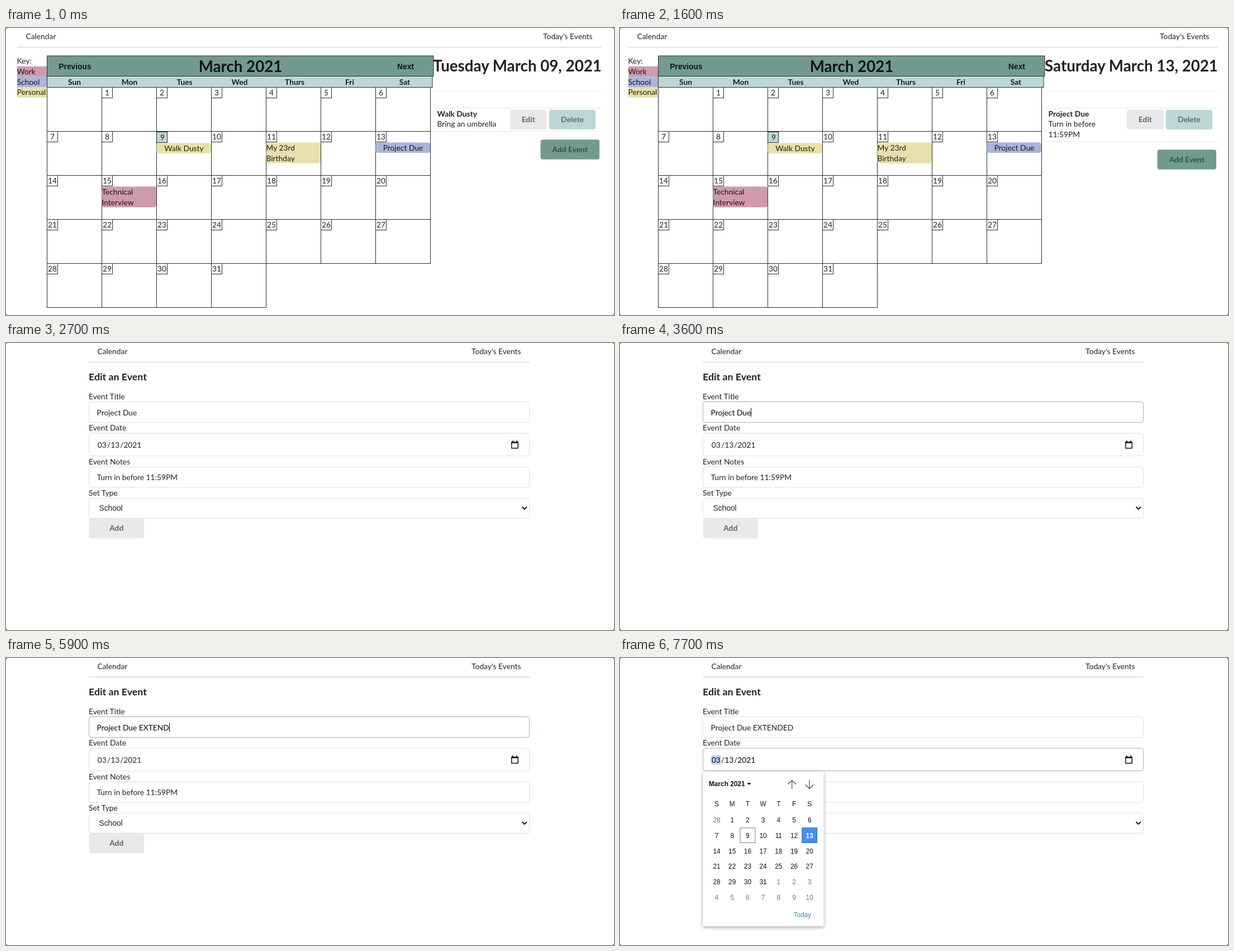
An HTML page that plays this animation: 1088 px wide and 515 px high, repeating every 8000 ms.

```html
<!DOCTYPE html>
<html lang="en">
<head>
<meta charset="utf-8">
<title>Calendar</title>
<style>
  html, body { margin: 0; width: 100%; height: 100%; overflow: hidden; background: #fff; }
  svg { display: block; width: 100%; height: 100%; }
  text { font: 13.8px Lato, sans-serif; fill: rgba(0, 0, 0, .87); white-space: pre; }
  .h1 { font-size: 27.7px; font-weight: 700; }
  .h3 { font-size: 17.8px; font-weight: 700; }
  .arial { font-family: "Liberation Sans", Arial, sans-serif; }
  .pick { font: 11.85px "Liberation Sans", Arial, sans-serif; fill: #111; }
  .b { font-weight: 700; }
  .m { text-anchor: middle; }
  .e { text-anchor: end; }
</style>
</head>
<body>
<svg id="stage" viewBox="0 0 1088 515"></svg>
<script>
const LOOP = 8000, STEP = 100;
const GREEN = '#739a8f', MINT = '#bdd7d6', GREY = '#e8e9ea', LINE = '#dfe0e1';
const WORK = '#d09aae', SCHOOL = '#a9b5db', PERSONAL = '#e8e0ab';
const INK = '#212121', GRID = '#2c2c2c';
const stage = document.getElementById('stage');

function add(parent, tag, attrs, content) {
  const el = document.createElementNS('http://www.w3.org/2000/svg', tag);
  for (const key in attrs) el.setAttribute(key, attrs[key]);
  if (content !== undefined) el.textContent = content;
  parent.append(el);
  return el;
}
const group = (p, dx = 0) => add(p, 'g', { transform: `translate(${dx} 0)` });
const text = (p, x, y, str, cls = '', style = '') => add(p, 'text', { x, y, class: cls, style }, str);
const rect = (p, x, y, x2, y2, fill, more = {}) =>
  add(p, 'rect', { x, y, width: x2 - x, height: y2 - y, fill, ...more });
const path = (p, d, stroke, width = 1, fill = 'none') =>
  add(p, 'path', { d, stroke, 'stroke-width': width, fill });

function button(p, x, y, x2, label, fill, ink = 'rgba(0,0,0,.58)') {
  return {
    box: rect(p, x, y, x2, y + 35.5, fill, { rx: 4 }),
    label: text(p, (x + x2) / 2, y + 22.4, label, 'b m', `fill:${ink}`)
  };
}

function navBar(p, left, right) {
  text(p, left + 15.5, 19.6, 'Calendar');
  text(p, right - 15.5, 19.6, "Today's Events", 'e');
  rect(p, left, 33.5, right, 35.5, LINE);
}

// Month view
const colX = i => 73.5 + 98 * i;
const rowY = i => Math.round(105.7 + 79.1 * i) + .5;

function tag(p, col, y, color, lines) {
  const x = colX(col);
  rect(p, x, y, x + 97.5, y + 18.6 * lines.length, color, { rx: 4 });
  lines.forEach((line, i) => lines.length > 1
    ? text(p, x, y + 14.5 + 18.7 * i, line)
    : text(p, x + 49, y + 14.3, line, 'm'));
}

function month(p) {
  text(p, 19.5, 64.3, 'Key:');
  [['Work', WORK], ['School', SCHOOL], ['Personal', PERSONAL]].forEach(([name, color], i) => {
    const y = 68.8 + 18.7 * i;
    rect(p, 20, y, 73, y + 18.7, color);
    text(p, 19.5, y + 14.2, name);
  });

  rect(p, 73.5, 50, 765, 86.5, GREEN, { stroke: GRID });
  text(p, 123.5, 73.5, 'Previous', 'arial b m');
  text(p, 419.5, 78.8, 'March 2021', 'h1 m');
  text(p, 715, 73.5, 'Next', 'arial b m');
  rect(p, 73.5, 86.5, 763, 106.5, MINT, { stroke: GRID });
  ['Sun', 'Mon', 'Tues', 'Wed', 'Thurs', 'Fri', 'Sat'].forEach((day, i) =>
    text(p, 122.5 + 98.5 * i, 101.8, day, 'b m'));

  for (let cell = 0; cell < 32; cell++) {
    const col = cell % 7, row = Math.floor(cell / 7), x = colX(col), y = rowY(row);
    rect(p, x, y, colX(col + 1), rowY(row + 1), 'none', { stroke: GRID });
    if (!cell) continue;
    const today = cell === 9, drop = today ? 1 : 0;
    rect(p, x, y + drop, x + 19, y + 19 + drop, today ? MINT : 'none', { stroke: GRID });
    text(p, x + 9.4 + drop, y + 14.7 + drop, cell, 'm');
  }
  tag(p, 2, 206.5, PERSONAL, ['Walk Dusty']);
  tag(p, 4, 205.5, PERSONAL, ['My 23rd', 'Birthday']);
  tag(p, 6, 205.5, SCHOOL, ['Project Due']);
  tag(p, 1, 284.5, WORK, ['Technical', 'Interview']);
}

function dayPanel(p, grow, heading, title, notes) {
  const left = 765 - grow, right = 1065 + grow;
  const extra = 18 * (notes.length - 1);
  text(p, 915, 78.2, heading, 'h1 m');
  [113.5, 143.5, 185.5 + extra].forEach(y => path(p, `M${left} ${y}H${right}`, '#e6e6e6'));
  text(p, left + 6.5, 159.3, title, 'b');
  notes.forEach((line, i) => text(p, left + 6.5, 177.4 + 18.6 * i, line));
  const edit = button(p, 902 + grow, 146.7, 967.5 + grow, 'Edit', GREY);
  button(p, 972 + grow, 146.7, 1055 + grow, 'Delete', MINT, '#5b706e');
  button(p, 956.5 + grow, 200.3 + extra, 1062 + grow, 'Add Event', GREEN, '#395048');
  return edit;
}

function home(grow, ...panel) {
  const g = group(stage);
  navBar(g, 20 - grow, 1065 + grow);
  month(group(g, -grow));
  return { g, edit: dayPanel(g, grow, ...panel) };
}

// Edit form
function field(p, label, y, y2) {
  text(p, 148, y - 4.6, label);
  return rect(p, 148.5, y, 936.5, y2, '#fff', { stroke: LINE, rx: 4 });
}

function datePicker(p) {
  const g = group(p);
  rect(g, 148, 203.5, 364.5, 481.5, '#fff',
    { style: 'filter:drop-shadow(0 2px 3px rgba(0,0,0,.35))' });
  text(g, 159, 230, 'March 2021', 'pick b');
  path(g, 'M227.5 224h7l-3.5 4z', 'none', 0, '#111');
  path(g, 'M307.7 235V219.5M300.7 226.5l7-7 7 7M339 219v15.5M332 227.5l7 7 7-7', '#444', 1.2);
  const x = i => 173 + 27.7 * i;
  [...'SMTWTFS'].forEach((c, i) => text(g, x(i), 266.3, c, 'pick m'));
  rect(g, 215, 304.8, 242, 331.5, '#fff', { stroke: '#777' });
  rect(g, 325.8, 304.8, 352.5, 331.5, '#4190f8', { stroke: '#2f66b5' });
  for (let i = 0; i < 42; i++) {
    const inMonth = i > 0 && i < 32;
    const day = i === 0 ? 28 : inMonth ? i : i - 31;
    const chosen = i === 13;
    text(g, x(i % 7), 295.2 + 27.7 * Math.floor(i / 7), day, chosen ? 'pick b m' : 'pick m',
      `fill:${chosen ? '#fff' : inMonth ? '#111' : '#777'}`);
  }
  text(g, 342, 464.6, 'Today', 'pick e', 'fill:#447fb5');
  return g;
}

function editForm() {
  const g = group(stage);
  navBar(g, 148, 937);
  text(g, 148, 67.3, 'Edit an Event', 'h3');
  const titleBox = field(g, 'Event Title', 105.5, 142.5);
  const title = text(g, 162.5, 129.7, '');
  const caret = rect(g, 0, 116.5, 1, 132.5, '#000');

  const dateBox = field(g, 'Event Date', 162, 202.5);
  const mark = rect(g, 163.5, 174.5, 180.5, 191, '#bcd5fb');
  const date = group(g);
  [[163.7, '03'], [181, '/'], [187.2, '13'], [204, '/'], [210.2, '2021']].forEach(([x, s]) =>
    text(date, x, 188, s, '', 'fill:inherit'));
  path(g, 'M904.8 178h11.4v10.7h-11.4z', '#111', 1.5);
  path(g, 'M904 178.8h13M907 175.2v3M914 175.2v3', '#111', 2);

  field(g, 'Event Notes', 222.5, 259);
  text(g, 162.5, 245.5, 'Turn in before 11:59PM');
  field(g, 'Set Type', 278.5, 314.5);
  text(g, 166.5, 301, 'School', 'arial');
  path(g, 'M923.5 294l4.2 4.2 4.2-4.2', '#111', 2);
  button(g, 148.5, 315, 247, 'Add', GREY);
  return { g, titleBox, title, caret, dateBox, mark, date, picker: datePicker(g) };
}

const tuesday = home(0, 'Tuesday March 09, 2021', 'Walk Dusty', ['Bring an umbrella']);
const saturday = home(5, 'Saturday March 13, 2021', 'Project Due', ['Turn in before', '11:59PM']);
const form = editForm();

// Rounded window corners
add(stage, 'path', {
  d: 'M0 0H1088V515H0ZM4 0A4 4 0 0 0 0 4V511A4 4 0 0 0 4 515H1084A4 4 0 0 0 1088 511V4A4 4 0 0 0 1084 0Z',
  fill: '#777', 'fill-rule': 'evenodd'
});

const TYPED = ' EXTENDED';
const KEY_TIMES = [4000, 4400, 4700, 5000, 5200, 5500, 5900, 6100, 6300];

const show = (el, on) => { el.style.display = on ? '' : 'none'; };
const ramp = (t, from, to) => Math.min(1, Math.max(0, (t - from) / (to - from)));
const mix = (a, b, k) => `color-mix(in srgb, ${a}, ${b} ${k * 100}%)`;

function focus(box, ink, k) {
  box.style.stroke = mix(LINE, '#a3b0b0', k);
  ink.style.fill = mix(INK, '#080808', k);
}

function draw(t) {
  show(tuesday.g, t < 1000);
  show(saturday.g, t >= 1000 && t < 2700);
  show(form.g, t >= 2700);

  const hover = ramp(t, 2150, 2300);
  saturday.edit.box.style.fill = mix(GREY, '#c9cacc', hover);
  saturday.edit.label.style.fill = mix('#616262', '#1d1d1d', hover);

  const onDate = ramp(t, 7050, 7200);
  focus(form.titleBox, form.title, ramp(t, 3450, 3600) - onDate);
  focus(form.dateBox, form.date, onDate);

  form.title.textContent = 'Project Due' + TYPED.slice(0, KEY_TIMES.filter(k => k <= t).length);
  const typing = t >= 3500 && t < 6800;
  show(form.caret, typing);
  if (typing) form.caret.setAttribute('x', Math.round(162.5 + form.title.getComputedTextLength()));
  show(form.mark, t >= 7100);
  show(form.picker, t >= 7300);
}

const start = performance.now();
function tick() {
  const t = (performance.now() - start) % LOOP;
  draw(Math.floor(t / STEP) * STEP);
  requestAnimationFrame(tick);
}
tick();
</script>
</body>
</html>
```
